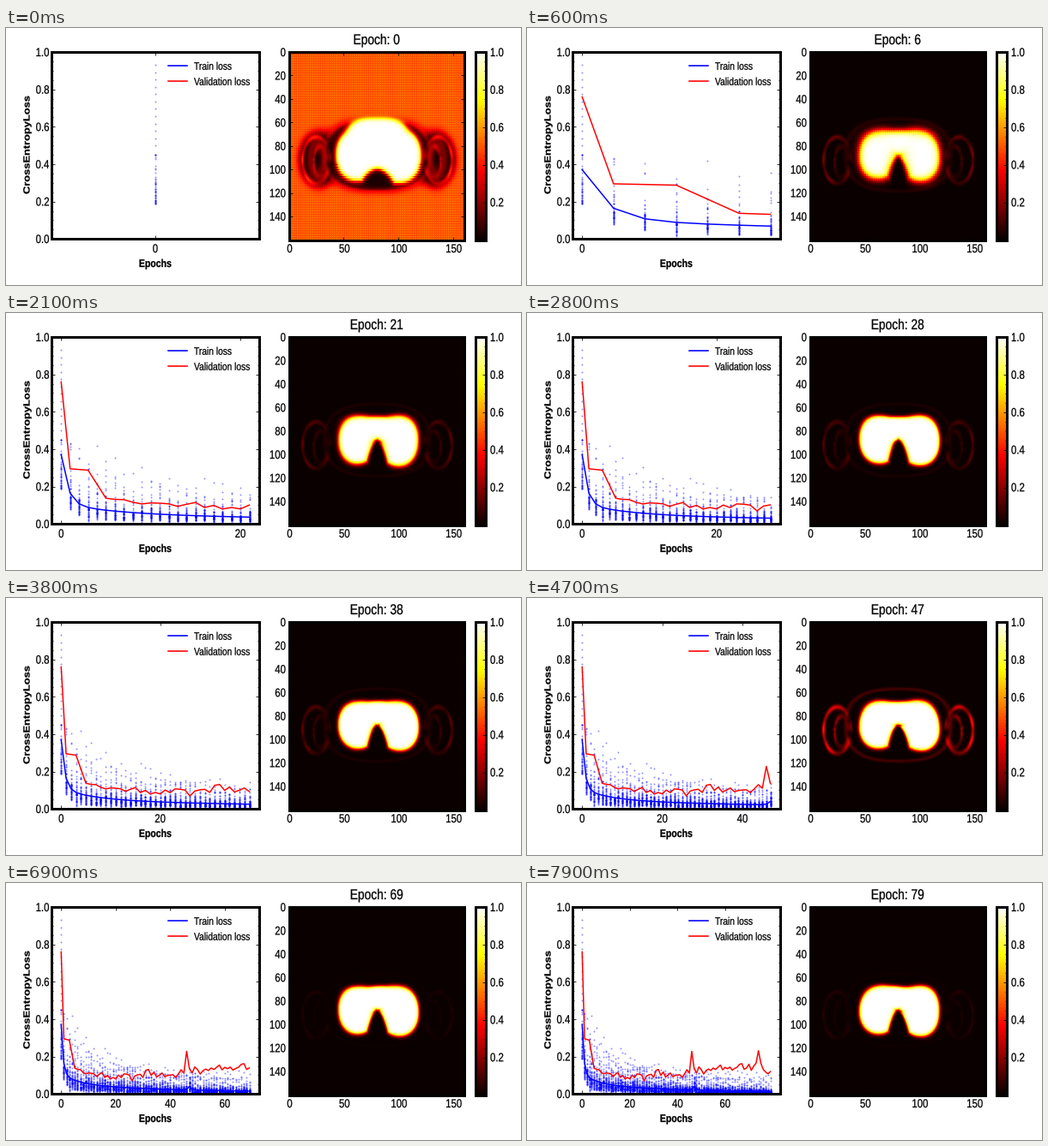
Animation of 600x300 px, one loop 8 s. Source, as a matplotlib script:

```python
import matplotlib.pyplot as plt
import numpy as np
from matplotlib.animation import FuncAnimation
from matplotlib.patches import PathPatch
from matplotlib.textpath import TextPath
from matplotlib.ticker import AutoMinorLocator
from matplotlib.transforms import Affine2D

W, H, DPI = 600, 300, 100
PX = 72 / DPI          # one pixel in points
ASPECT = 0.82          # the whole plot is narrowed horizontally
EPOCHS = 80
LEFT, IMAGE, BAR = (53.3, 28, 294.5, 246.3), (329.5, 28, 533.5, 247.5), (547.2, 28, 558.6, 247.5)

rng = np.random.default_rng(7)


def sigmoid(v):
    return 1 / (1 + np.exp(-np.clip(v, -40, 40)))


# ---------- loss curves ----------
steps = np.arange(EPOCHS)


def spike(center, height, rate=1.6):
    return height * np.exp(-rate * np.abs(steps - center))


train = (.262 * np.exp(-steps / .72) + .06 * np.exp(-steps / 7)
         + .048 * np.exp(-steps / 60) + spike(47, .018))
val = np.interp(steps, [0, 1, 3, 5, 10, 40, 60, 74, 79],
                [.76, .295, .288, .138, .107, .1, .14, .155, .1])
val += rng.normal(0, .013, EPOCHS) * sigmoid(steps - 8)
val += spike(31.6, .08) + spike(46, .105) + spike(74, .06)


def batch_losses(e):
    if e == 0:
        return np.r_[.19 + rng.exponential(.09, 48).clip(0, .26), np.linspace(.5, .93, 12)]
    spread = .35 if e < 3 else .55
    dense = train[e] * .88 * np.exp(spread * rng.normal(size=48))
    top = .1 + .33 * np.exp(-e / 14)
    loose = rng.uniform(train[e] * 1.6, top * .7 + train[e], 4)
    return np.r_[dense, loose, top * rng.uniform(.75, 1.2)].clip(.006, 1)


batches = [batch_losses(e) for e in steps]
dot_x = np.concatenate([np.full(len(b), e) for e, b in enumerate(batches)])
dot_y = np.concatenate(batches)
dot_end = np.cumsum([len(b) for b in batches])

# ---------- predicted mask ----------
N, MID = 160, 432
cell = (np.arange(N) + .5) / N
X, Y = np.meshgrid(IMAGE[0] + (IMAGE[2] - IMAGE[0]) * cell - MID,
                   IMAGE[1] + (IMAGE[3] - IMAGE[1]) * cell)
SIDE = np.abs(X)       # the body is symmetric about its middle
rows, cols = np.indices((N, N))
grid_dots = (rows % 2) * (cols % 2) * 2 - .5
stripes = rows % 2 * 2 - 1
angle = np.arctan2(Y - 150, X)


def oval(cx, cy, rx, ry, power=2, x=X):
    """Approximate distance to an oval, negative inside."""
    r = (np.abs((x - cx) / rx) ** power + np.abs((Y - cy) / ry) ** power) ** (1 / power)
    return (r - 1) * min(rx, ry)


def join(a, b, k):
    """Smooth union of two distances."""
    h = np.maximum(k - np.abs(a - b), 0) / k
    return np.minimum(a, b) - h * h * k / 4


def ring(dist, width):
    return np.exp(-(dist / width) ** 2)


def two_lobes(grow, bridge, apex, spread):
    """Depth inside two joined lobes with a parabolic notch below."""
    lobes = join(oval(-23, 149, 22 + grow, 27 + grow, 2.2),
                 oval(25, 150, 23 + grow, 28.5 + grow, 2.2), 4)
    shape = join(lobes, oval(0, 136, 34 + grow, bridge, 3), 4)
    notch = (X ** 2 / spread - (Y - apex)) / np.hypot(1, 2 * X / spread)
    return np.minimum(-shape, notch)


rough = two_lobes(3, 30, 165, 24)
final = two_lobes(0, 14, 148, 6)

torso = oval(0, 149, 61, 42, 2.6)
body = join(torso, oval(68, 154, 23, 32, x=SIDE), 8)
marrow = ring(oval(70, 154, 8, 18, x=SIDE), 4)

turn = np.arctan2(Y - 155, SIDE - 70)
patchy = .5 + .3 * np.cos(turn) + .2 * np.sin(5 * turn + X / 20)
arm_lines = (ring(oval(71, 155, 16, 27, x=SIDE), 1.6)
             + .6 * ring(oval(66, 157, 8, 18, x=SIDE), 1.5))
skin = arm_lines * patchy + .2 * ring(torso, 1.8)

glow = (.2 * np.exp(-steps / 3) + .16 * sigmoid((51 - steps) / 1.5)
        + spike(47, .3) + .06 * sigmoid(steps - 68))
glow *= rng.uniform(.8, 1.2, EPOCHS)
edge = 1 + 1.3 * np.exp(-((steps - 10) / 9) ** 2)
grain = np.clip(1 - steps / 24, 0, 1)
wobble = rng.uniform(-.4, .4, (EPOCHS, 3))


def mask(e):
    back = .5 * np.exp(-e / .9)
    dark = sigmoid(-body / 1.9)
    field = back * (1 - .95 * dark + .3 * marrow * dark + .12 * grid_dots * (1 - dark))
    field += glow[e] * skin
    settle = np.exp(-e / 2.2)
    depth = settle * rough + (1 - settle) * final
    depth += sum(a * np.sin((k + 3) * angle + e * (k + 1))
                 for k, a in enumerate(wobble[e])) * min(1, e / 3)
    texture = settle * stripes * (Y > 160) + (1 - settle) * grid_dots
    blob = sigmoid((depth + .3 + grain[e] * texture) / edge[e])
    return np.clip(field * (1 - blob) + blob, 0, 1)


masks = [mask(e) for e in steps]

# ---------- figure ----------
fig = plt.figure(figsize=(W / DPI, H / DPI), dpi=DPI, facecolor="white")


def panel(box):
    x0, y0, x1, y1 = box
    ax = fig.add_axes([x0 / W, 1 - y1 / H, (x1 - x0) / W, (y1 - y0) / H])
    ax.tick_params(which="both", direction="in", top=True, right=True,
                   labelbottom=False, labelleft=False, length=4 * PX, width=.8 * PX)
    ax.tick_params(which="minor", length=2.5 * PX)
    for s in ax.spines.values():
        s.set_linewidth(3 * PX)
    return ax


sheet = fig.add_axes([0, 0, 1, 1], zorder=5)
sheet.set(xlim=(0, W), ylim=(H, 0))
sheet.axis("off")


def glyphs(text, x, y, size, align="center", weight="normal", turned=0):
    raw = TextPath((0, 0), text, size=size,
                   prop={"family": "Liberation Sans", "weight": weight})
    path = Affine2D().rotate_deg(turned).scale(ASPECT, -1).transform_path(raw)
    box = path.get_extents()
    if turned:
        return Affine2D().translate(x, y - (box.y0 + box.y1) / 2).transform_path(path)
    shift = {"left": 0, "center": (box.x0 + box.x1) / 2, "right": box.x1}[align]
    return Affine2D().translate(x - shift, y).transform_path(path)


def write(*args, **kw):
    return sheet.add_patch(PathPatch(glyphs(*args, **kw), fc="black", ec="black", lw=.25 * PX))


TICK, NAME, TITLE = 13.9, 12.85, 16.8

loss_ax = panel(LEFT)
loss_ax.set(ylim=(0, 1), yticks=np.arange(0, 1.01, .2))
loss_ax.yaxis.set_minor_locator(AutoMinorLocator(4))
dots, = loss_ax.plot([], [], "o", ms=2 * PX, mew=0, color="blue", alpha=.42)
train_line, = loss_ax.plot([], [], color="blue", lw=1.5 * PX)
val_line, = loss_ax.plot([], [], color="red", lw=1.5 * PX)

img_ax = panel(IMAGE)
picture = img_ax.imshow(masks[0], cmap="hot", vmin=0, vmax=1, aspect="auto",
                        extent=(0, N, N, 0), interpolation="bilinear")
img_ax.set(xticks=range(0, N, 50), yticks=range(0, N, 20))

bar_ax = panel(BAR)
bar_ax.imshow(np.linspace(0, 1, 256)[:, None], cmap="hot", origin="lower",
              aspect="auto", extent=(0, 1, 0, 1))
bar_ax.set(xticks=[], yticks=np.arange(.2, 1.01, .2))
bar_ax.yaxis.set_minor_locator(AutoMinorLocator(4))
bar_ax.tick_params(which="both", left=False)

for k in range(6):
    write(f"{k / 5:.1f}", 50, 251 - 43.6 * k, TICK, "right")
    if k:
        write(f"{k / 5:.1f}", 564, 252 - 43.8 * k, TICK, "left")
for k in range(8):
    write(str(20 * k), 325.5, 33 + 27.4 * k, TICK, "right")
for k in range(4):
    write(str(50 * k), 330.5 + 63.8 * k, 262, TICK)
write("Epochs", 174, 279, NAME, weight="bold")
write("CrossEntropyLoss", 27.5, 136.5, NAME, weight="bold", turned=90)
for name, color, y in (("Train loss", "blue", 44), ("Validation loss", "red", 62)):
    sheet.plot([189, 211], [y, y], color=color, lw=1.6 * PX)
    write(name, 219, y + 4.7, 12.5, "left")

title = write("Epoch: 0", MID, 19, TITLE)
x_labels = [write(str(v), 174, 262, TICK) for v in range(0, EPOCHS, 20)]


def update(e):
    n = dot_end[e]
    dots.set_data(dot_x[:n], dot_y[:n])
    train_line.set_data(steps[:e + 1], train[:e + 1])
    val_line.set_data(steps[:e + 1], val[:e + 1])
    pad = .05 * e or .055
    lo, hi = -pad, e + pad
    ticks = [v for v in range(0, EPOCHS, 20) if v <= hi]
    loss_ax.set_xticks(ticks)
    loss_ax.set_xlim(lo, hi)
    for i, label in enumerate(x_labels):
        label.set_visible(i < len(ticks))
        if i < len(ticks):
            x = LEFT[0] + (LEFT[2] - LEFT[0]) * (ticks[i] - lo) / (hi - lo)
            label.set_path(glyphs(str(ticks[i]), x, 262, TICK))
    picture.set_data(masks[e])
    title.set_path(glyphs(f"Epoch: {e}", MID, 19, TITLE))
    return []


anim = FuncAnimation(fig, update, frames=EPOCHS, interval=100,
                     repeat=True, repeat_delay=0, blit=False)
plt.show()
```
